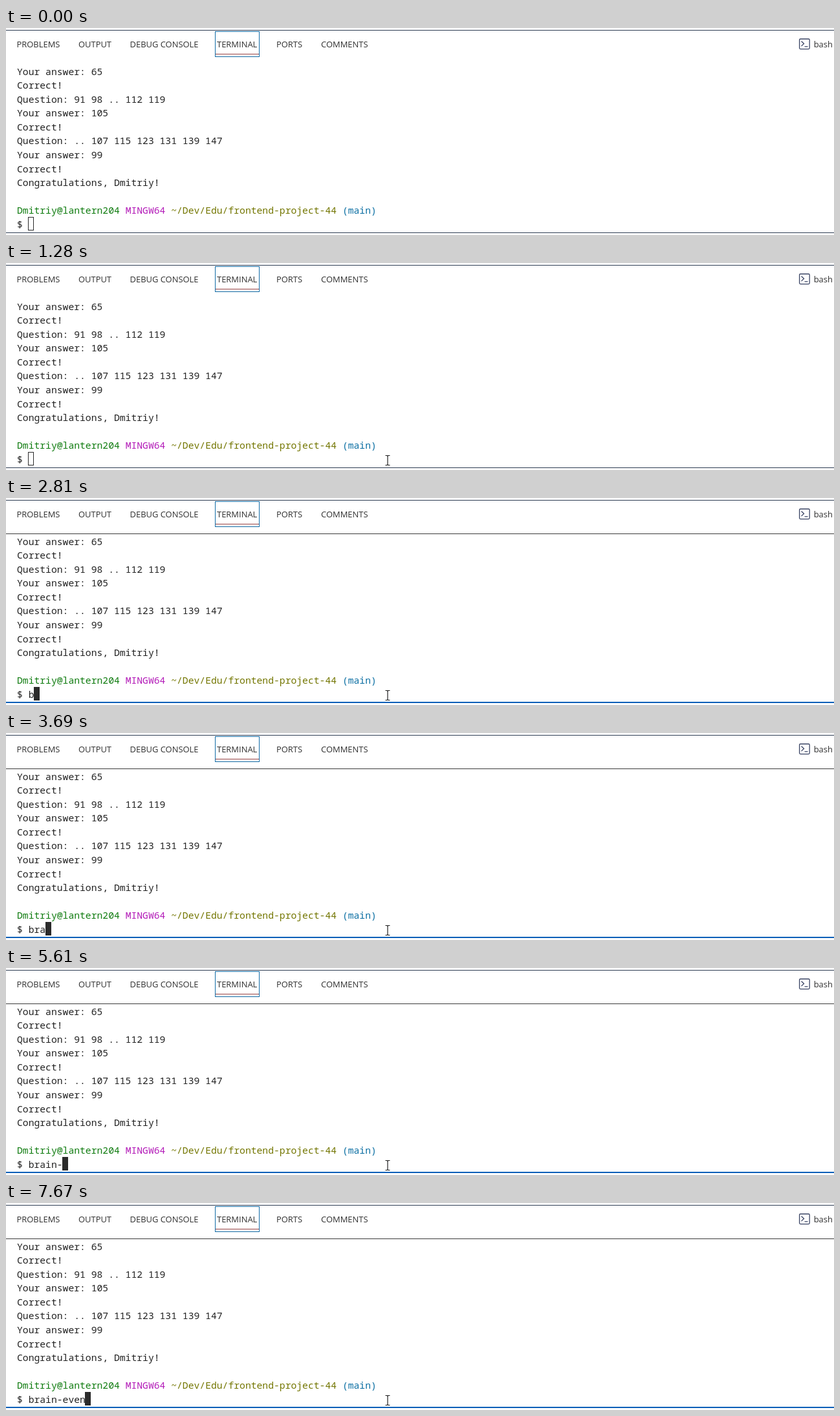
Write an HTML page that moves like this. It is 1280 px wide and 321 px high and loops after 8 s.

```html
<!DOCTYPE html>
<html lang="en">
<head>
<meta charset="utf-8">
<title>Terminal</title>
<style>
  html, body { margin: 0; width: 100%; height: 100%; overflow: hidden; background: #fff; }
  svg { display: block; width: 1280px; height: 321px; }
  text { white-space: pre; }
  .tab { font: 12.95px "Open Sans", "Noto Sans", sans-serif; fill: #303030; }
  .term { font: 14.71px "Noto Sans Mono", "Liberation Mono", monospace; fill: #222; }
  .line { fill: #2c3a52; }
  .user { fill: #107c10; }
  .system { fill: #b31bb8; }
  .path { fill: #737600; }
  .branch { fill: #0b6fa3; }
</style>
</head>
<body>
<svg viewBox="0 0 1280 321">
  <rect class="line" y="3" width="1280" height="1"/>
  <rect id="divider" y="55" width="1280" height="1" fill="#3c3c3c"/>
  <rect id="bottom" class="line" y="317" width="1280" height="1"/>
  <rect id="focusLine" y="316" width="1280" height="2" fill="#005fb8"/>

  <g id="tabs"></g>
  <rect x="323.5" y="5.5" width="68" height="39" fill="none" stroke="#126ca6"/>
  <rect x="324" y="40" width="67" height="1" fill="#9c4545"/>

  <g fill="none" stroke="#3a4464" stroke-width="1.3">
    <rect x="1226.6" y="17" width="15.6" height="15.6" rx="1.5"/>
    <path d="M1229.5 20.5l4 3.8-4 3.8M1234.5 28.8h5"/>
  </g>

  <g id="output"></g>
  <rect id="caret" y="293.5" width="8" height="20" stroke="#2b2b2b"/>
  <circle id="click" cx="587.5" cy="305.5" r="14" fill="#ff0" fill-opacity=".47"/>
  <path id="pointer" fill="none" stroke="#222" stroke-width="1.2"
    d="M-3.5-7.5h2.5l1 1 1-1h2.5M0-6.5v13M-3.5 7.5h2.5l1-1 1 1h2.5"/>
</svg>
<script>
const LOOP = 8000;
const CELL = 14.71 * 0.6;
const LEFT = 17;
const COMMAND = "brain-even";
const KEY_TIMES = [2810, 3090, 3690, 4620, 4750, 5610, 6090, 6550, 6610, 7670];
const FOCUS = 1350, CLICK_END = 1490;
const ENTER = 330, SETTLE = 1080, STEP = 75;

const el = id => document.getElementById(id);
const show = (id, on) => el(id).setAttribute("visibility", on ? "visible" : "hidden");

function addText(parent, cls, x, y, parts) {
  const make = tag => document.createElementNS("http://www.w3.org/2000/svg", tag);
  const node = make("text");
  node.setAttribute("class", cls);
  node.setAttribute("x", x);
  node.setAttribute("y", y);
  for (const [str, color] of parts) {
    const span = make("tspan");
    span.textContent = str;
    if (color) span.setAttribute("class", color);
    node.append(span);
  }
  parent.append(node);
  return node;
}

const tabs = [["PROBLEMS", 16.5], ["OUTPUT", 112], ["DEBUG CONSOLE", 191.5],
  ["TERMINAL", 326], ["PORTS", 418], ["COMMENTS", 487], ["bash", 1248.7]];
for (const [label, x] of tabs) addText(el("tabs"), "tab", x, 30.3, [[label]]);

const lines = [
  "Your answer: 65", "Correct!", "Question: 91 98 .. 112 119",
  "Your answer: 105", "Correct!", "Question: .. 107 115 123 131 139 147",
  "Your answer: 99", "Correct!", "Congratulations, Dmitriy!", ""
].map(str => [[str]]);
lines.push([["Dmitriy@lantern204", "user"], [" "], ["MINGW64", "system"], [" "],
  ["~/Dev/Edu/frontend-project-44", "path"], [" "], ["(main)", "branch"]]);
lines.push([["$ "]]);
const rows = lines.map((parts, i) => addText(el("output"), "term", LEFT, 72.6 + i * 21.57, parts));
const prompt = rows[rows.length - 1].firstChild;

// The pointer enters at the right, rises a little and settles beside the prompt.
function pointerAt(t) {
  if (t >= SETTLE + 70) return [590, 306];
  const stepped = ENTER + Math.floor((t - ENTER) / STEP) * STEP;
  const p = Math.min(1, (stepped - ENTER) / (SETTLE - ENTER));
  const ease = p * p * (3 - 2 * p);
  return [1203 - 615 * ease, 313 - 7 * ease - 26 * Math.sin(Math.PI * ease)];
}

function draw(t) {
  const focused = t >= FOCUS;
  const typed = KEY_TIMES.filter(k => t >= k).length;
  prompt.textContent = "$ " + COMMAND.slice(0, typed);

  const caret = el("caret");
  caret.setAttribute("x", Math.floor(LEFT + (2 + typed) * CELL) + 0.5);
  caret.setAttribute("fill", focused ? "#2b2b2b" : "none");

  show("divider", focused);
  show("focusLine", focused);
  show("bottom", !focused);
  show("click", focused && t < CLICK_END);
  show("pointer", t >= ENTER);
  const [x, y] = pointerAt(t).map(Math.round);
  el("pointer").setAttribute("transform", `translate(${x} ${y})`);
}

const start = performance.now();
function tick() {
  draw((performance.now() - start) % LOOP);
  requestAnimationFrame(tick);
}
tick();
</script>
</body>
</html>
```
